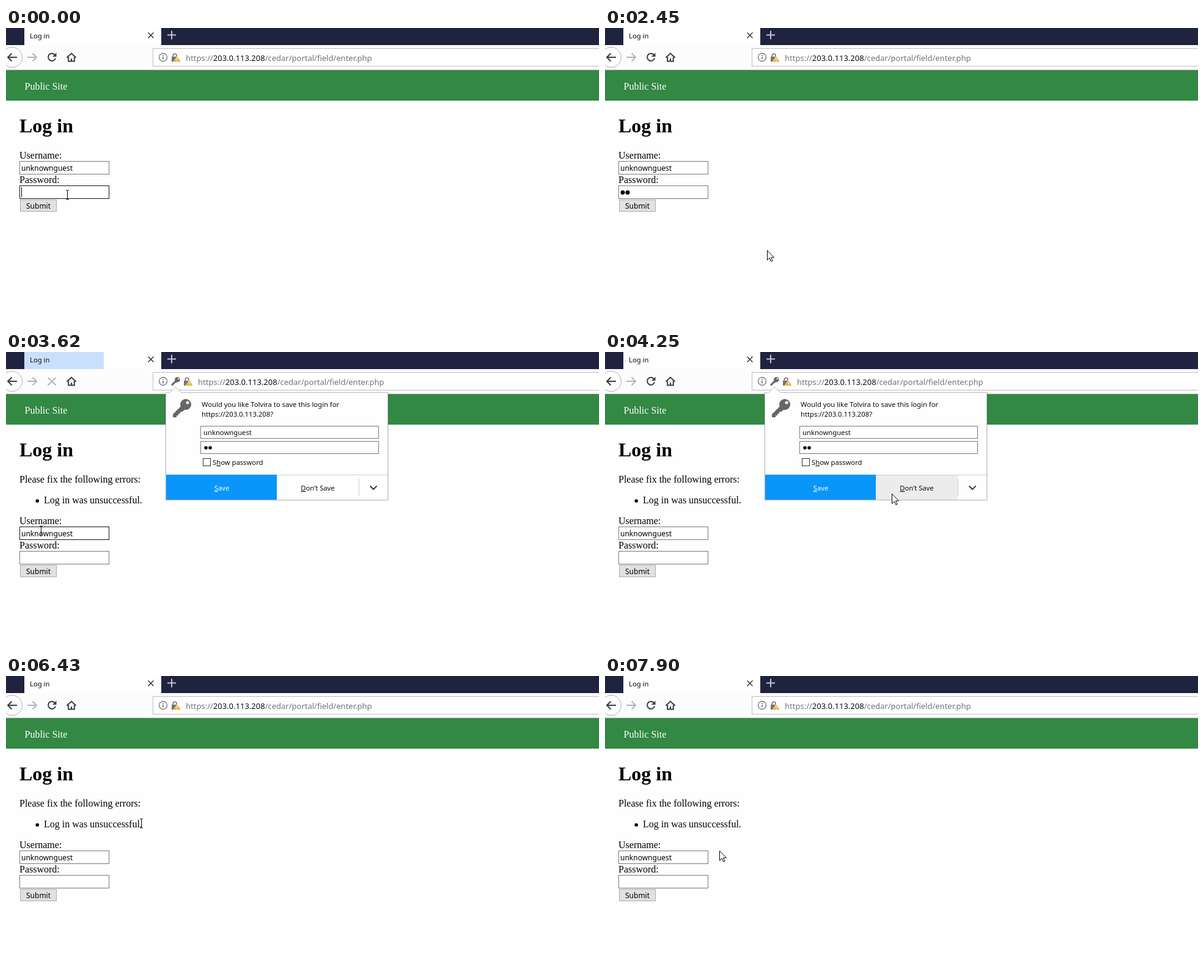
Animation, 970 px wide and 485 px high, one loop 8 s. Source, as an HTML page:

```html
<!DOCTYPE html>
<html lang="en">
<head>
<meta charset="utf-8">
<title>Log in</title>
<style>
  html, body { margin: 0; width: 100%; height: 100%; overflow: hidden; background: #fefefe; }
  svg { display: block; width: 970px; height: 485px; }
  text { font: 16px "Liberation Serif", serif; white-space: pre; }
  .ui { font: 11.25px "Noto Sans", "Open Sans", sans-serif; fill: #0c0c0d; }
  .field { font-size: 12px; fill: #000; }
  .url { font-size: 13px; fill: #737373; }
  .h1 { font-size: 32px; font-weight: bold; }
  .host { fill: #0c0c0d; }
  .mid { text-anchor: middle; }
  .key { text-decoration: underline; }
  .box { fill: #fff; stroke: #7a7a7a; }
  .box.hover { stroke: #171717; }
  .button { fill: #e1e1e1; stroke: #adadad; }
  .button.hover { fill: #e5f1fb; stroke: #0078d7; }
  .icon { fill: none; stroke: #3d3d40; stroke-width: 2; }
  .thin { stroke-width: 1.6; }
  .dim { stroke: #b4b4b4; }
  .light { stroke: #c3c4cf; }
  rect { shape-rendering: crispEdges; }
</style>
</head>
<body>
<svg viewBox="0 0 970 485">
  <defs>
    <g id="keyShape" fill="#666">
      <path d="M14 11 0 25v5h6v-3h3v-3h3v-3h3l5-4z"/>
      <path fill-rule="evenodd" d="M12 9a9 9 0 1 0 18 0a9 9 0 1 0-18 0zM21.5 6a2.5 2.5 0 1 0 5 0a2.5 2.5 0 1 0-5 0z"/>
    </g>
  </defs>
  <rect width="970" height="485" fill="#fefefe"/>

  <!-- tab strip -->
  <rect width="970" height="28" fill="#202340"/>
  <rect x="30" width="224" height="28" fill="#fefefe"/>
  <rect id="burst" x="30" height="28" fill="#c8e0fb"/>
  <circle id="throbber" cx="41" cy="12" r="2" fill="#444"/>
  <text id="tabTitle" class="ui" y="17">Log in</text>
  <path class="icon thin" d="M232.5 7.5l9 9m0-9l-9 9"/>
  <path class="icon light" d="M264 11.5h14M271 4.5v14"/>

  <!-- toolbar -->
  <rect y="28" width="970" height="40" fill="#fcfcfc"/>
  <rect y="68" width="970" height="1" fill="#cfcfcf"/>
  <circle cx="10" cy="48" r="16.5" fill="#fefefe" stroke="#b0b0b0"/>
  <path class="icon" d="M3 48h15M9.5 41.5L3 48l6.5 6.5"/>
  <path class="icon dim" d="M35 48h15M43.5 41.5L50 48l-6.5 6.5"/>
  <g id="reload">
    <path class="icon" d="M79.5 43.5a6.1 6.1 0 1 0 1.5 6"/>
    <path fill="#3d3d40" d="M82.5 40.5v6.5h-6.5z"/>
  </g>
  <path id="stop" class="icon dim" d="M68.5 42l13 12.5m0-12.5l-13 12.5"/>
  <path class="icon" d="M99.5 48.5L107 41.5l7.5 7M102.2 47.5v7h9.6v-7"/>
  <rect x="106" y="50" width="2" height="5" fill="#3d3d40"/>
  <rect x="240.5" y="33.5" width="740" height="29" fill="#fff" stroke="#bdbdbd"/>
  <circle cx="257" cy="48" r="6.5" fill="none" stroke="#737373" stroke-width="1.3"/>
  <path stroke="#737373" stroke-width="1.6" d="M257 47v4.5M257 44v1.7"/>
  <use id="smallKey" href="#keyShape" transform="translate(270.5 41) scale(.47)"/>
  <g id="address">
    <path fill="none" stroke="#737373" stroke-width="1.6" d="M273.3 48v-3a2.8 2.8 0 0 1 5.6 0v2"/>
    <rect x="271" y="47" width="9" height="8" fill="#737373"/>
    <path fill="#f7a91e" stroke="#fff" stroke-width=".8" d="M280 46.2l6.2 9.6h-12.4z"/>
    <path stroke="#fff" stroke-width="1.3" d="M280 49.5v3M280 53.4v1.3"/>
    <text class="ui url" x="294" y="54">https://<tspan class="host">203.0.113.208</tspan>/cedar/portal/field/enter.php</text>
  </g>

  <!-- page -->
  <rect y="69" width="970" height="50" fill="#338844"/>
  <text x="30.5" y="101" fill="#fff">Public Site</text>
  <text class="h1" x="22" y="171">Log in</text>
  <g id="errors">
    <text x="22" y="214">Please fix the following errors:</text>
    <circle cx="51.2" cy="244" r="2.8"/>
    <text x="62" y="248">Log in was unsuccessful.</text>
  </g>
  <g id="form">
    <text x="22" y="214">Username:</text>
    <rect id="user" class="box" x="22.5" y="218.5" width="146" height="21"/>
    <text class="ui field" x="25" y="234">unknownguest</text>
    <text x="22" y="254">Password:</text>
    <rect id="pass" class="box" x="22.5" y="258.5" width="146" height="21"/>
    <circle id="dot1" cx="29" cy="269.5" r="3.5"/>
    <circle id="dot2" cx="37" cy="269.5" r="3.5"/>
    <rect id="caret" y="261" width="1" height="16"/>
    <rect id="submit" class="button" x="23.5" y="281.5" width="59" height="19"/>
    <text class="ui field" x="33" y="296">Submit</text>
  </g>

  <!-- save prompt -->
  <g id="prompt">
    <rect x="260" y="66" width="367" height="178" rx="2" opacity=".06"/>
    <path fill="#fefefe" stroke="#bcbcbc" d="M261.5 66.5H267.5L277 57.5L286.5 66.5H624.5V242.5H261.5z"/>
    <use href="#keyShape" transform="translate(273 77)"/>
    <text class="ui" x="320" y="90">Would you like Tolvira to save this login for</text>
    <text class="ui" x="320" y="106">https://203.0.113.208?</text>
    <rect class="box" x="318.5" y="121.5" width="291" height="20"/>
    <text class="ui" x="323" y="136">unknownguest</text>
    <rect class="box" x="318.5" y="146.5" width="291" height="20"/>
    <circle cx="327" cy="157" r="2.8"/>
    <circle cx="334" cy="157" r="2.8"/>
    <rect x="322.5" y="174.5" width="12" height="12" fill="#fff" stroke="#333"/>
    <text class="ui" x="338" y="185">S<tspan class="key">h</tspan>ow password</text>
    <rect x="262" y="201" width="362" height="1" fill="#cfcfcf"/>
    <rect x="262" y="201" width="181" height="41" fill="#0a95fa"/>
    <rect id="decline" x="443" y="202" width="134" height="40" fill="#ececec"/>
    <text class="ui mid" x="353" y="227" style="fill:#fff"><tspan class="key">S</tspan>ave</text>
    <text class="ui mid" x="510" y="227"><tspan class="key">D</tspan>on’t Save</text>
    <rect x="577" y="208" width="1" height="28" fill="#cfcfcf"/>
    <path class="icon" d="M595.5 219.5l5.5 5.5 5.5-5.5"/>
  </g>

  <path id="arrow" fill="#fff" stroke="#000" d="M.5.5v15.8l3.7-3.5 2.7 5.7 2.3-1.1-2.6-5.5h4.9z"/>
  <path id="beam" fill="none" stroke="#000" d="M-2.5-7.5h2l.5.5.5-.5h2M-2.5 7.5h2l.5-.5.5.5h2M0-7v14"/>
</svg>
<script>
const LOOP = 8000, STEP = LOOP / 60, BLINK = 502;
const TYPE = 1130, BLUR = 3200, SUBMIT = 3350, ANSWER = 3470, LOADED = 3620, READY = 4010, CLOSED = 4800;

// stops of the pointer: time, x, y
const stops = [
  [0, 100, 273], [800, 100, 273], [1200, 549, 432], [1400, 301, 381], [2130, 301, 381],
  [2400, 265, 364], [3200, 56, 292], [3600, 57, 292], [4260, 513, 226], [4800, 513, 226],
  [5200, 185, 256], [5730, 63, 248], [6390, 221, 241], [6660, 226, 241],
  [7260, 43, 231], [7730, 233, 286], [7860, 187, 286], [LOOP, 187, 286]
];

const el = {};
document.querySelectorAll("svg [id]").forEach(n => el[n.id] = n);

const clamp = (v, lo, hi) => Math.min(hi, Math.max(lo, v));
const ease = p => p * p * (3 - 2 * p);
const show = (node, on) => node.setAttribute("visibility", on ? "visible" : "hidden");
const place = (node, x, y) => node.setAttribute("transform", `translate(${x} ${y})`);
const inside = (x, y, l, t, r, b) => x >= l && x < r && y >= t && y < b;

function pointerAt(t) {
  const now = Math.floor(t / STEP) * STEP;
  const i = stops.findLastIndex(s => s[0] <= now);
  const [t0, x0, y0] = stops[i], [t1, x1, y1] = stops[i + 1];
  const p = ease((now - t0) / (t1 - t0));
  return [Math.round(x0 + (x1 - x0) * p), Math.round(y0 + (y1 - y0) * p)];
}

function drawChrome(t) {
  const loading = t >= SUBMIT && t < LOADED;
  const stopping = t >= ANSWER && t < READY;
  const hasKey = t >= SUBMIT && t < CLOSED;
  show(el.throbber, loading);
  el.tabTitle.setAttribute("x", loading ? 61 : 39);
  show(el.reload, !stopping);
  show(el.stop, stopping);
  show(el.smallKey, hasKey);
  place(el.address, hasKey ? 20 : 0, 0);

  const p = (t - LOADED) / 240;
  show(el.burst, p >= 0 && p < 1);
  el.burst.setAttribute("width", 130 + 94 * clamp(p, 0, 1));
  el.burst.setAttribute("opacity", 1 - clamp(p, 0, 1));
}

function drawPage(t) {
  const [x, y] = pointerAt(t);
  const failed = t >= ANSWER;
  const saving = failed && t < CLOSED;
  const shift = failed ? 68 : 0;
  const dots = failed ? 0 : clamp(Math.ceil((t - TYPE + 1) / 130), 0, 2);

  show(el.errors, failed);
  place(el.form, 0, shift);
  show(el.dot1, dots > 0);
  show(el.dot2, dots > 1);
  show(el.caret, t < BLUR && Math.floor((t + 65) / BLINK) % 2 === 0);
  el.caret.setAttribute("x", 25 + 8 * dots);
  show(el.prompt, saving);
  show(el.decline, saving && inside(x, y, 443, 202, 577, 242));

  const overUser = inside(x, y - shift, 22, 218, 169, 240);
  const overPass = inside(x, y - shift, 22, 258, 169, 280);
  const overText = failed && inside(x, y, 62, 234, 223, 252);
  el.user.classList.toggle("hover", overUser);
  el.pass.classList.toggle("hover", overPass);
  el.submit.classList.toggle("hover", inside(x, y - shift, 23, 281, 83, 301));

  const editing = overUser || overPass || overText;
  show(el.beam, editing);
  show(el.arrow, !editing);
  place(el.beam, x + .5, y + .5);
  place(el.arrow, x, y);
}

const start = performance.now();
function tick() {
  const t = (performance.now() - start) % LOOP;
  drawChrome(t);
  drawPage(t);
  requestAnimationFrame(tick);
}
tick();
</script>
</body>
</html>
```
